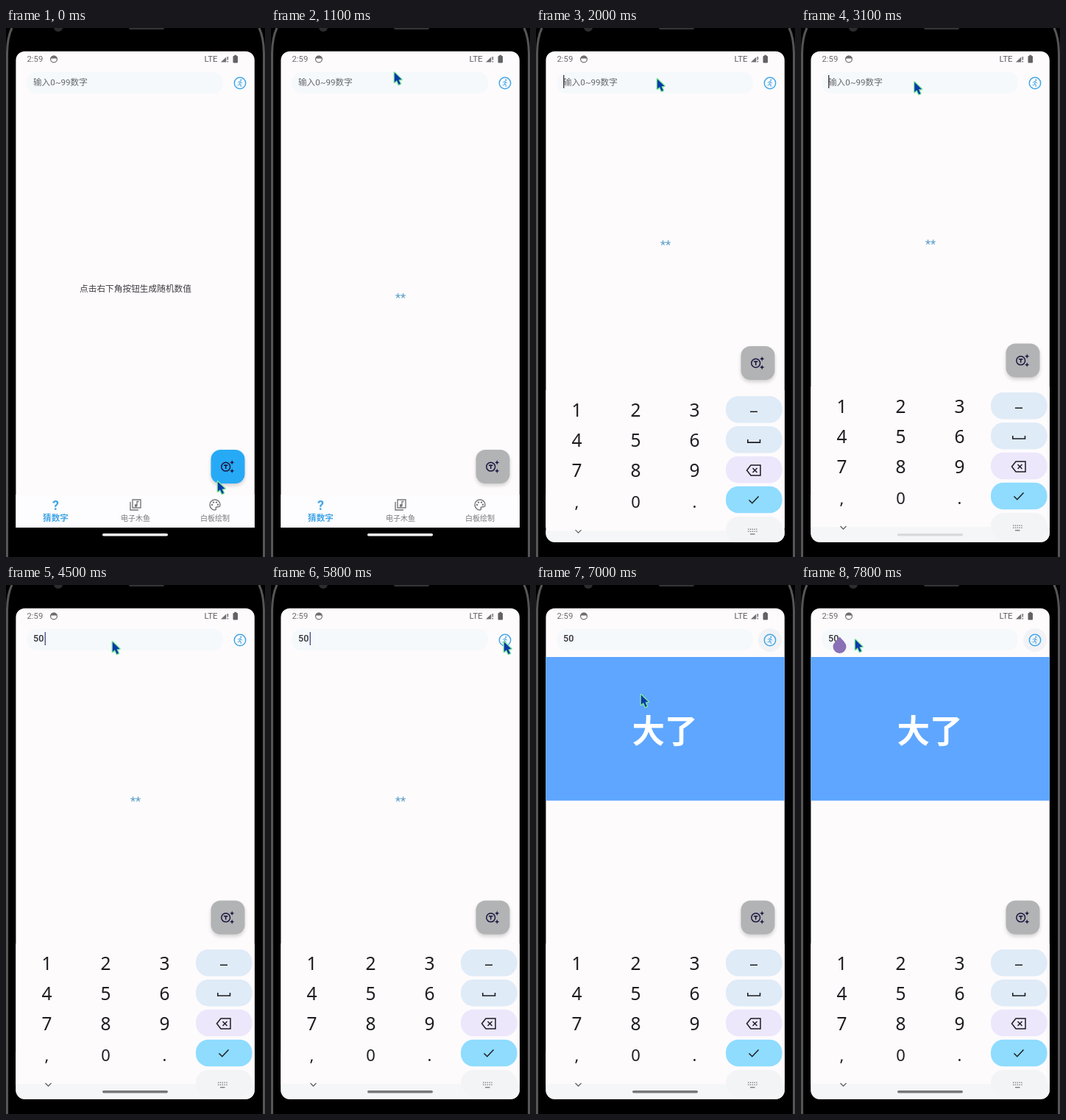
Recreate the animation shown at these times as an HTML page with a canvas. Size 352x720 px, loop 8000 ms.

```html
<!DOCTYPE html>
<html lang="zh">
<head>
<meta charset="utf-8">
<title>猜数字</title>
<style>
html, body { margin: 0; width: 100%; height: 100%; overflow: hidden; background: #000; }
canvas { display: block; width: 352px; height: 720px; }
</style>
</head>
<body>
<canvas id="stage"></canvas>
<script>
const W = 352, H = 720, LOOP = 8000;
const FONT = 'Roboto, "Noto Sans CJK SC", "Noto Sans CJK", sans-serif';
const KEY_FONT = '"Noto Sans", "Open Sans", sans-serif';
const PAGE = '#fefbfd', BLUE = '#41a5e6', GREY = '#777779', INK = '#1d1d20';
const canvas = document.getElementById('stage');
const dpr = window.devicePixelRatio || 1;
canvas.width = W * dpr;
canvas.height = H * dpr;
const c = canvas.getContext('2d');

// Pointer stops: time, x, y
const STOPS = [
  [0, 287, 617], [550, 287, 617], [1080, 167, 60], [1400, 164, 69],
  [2780, 164, 69], [3400, 144, 77], [4950, 144, 77], [5750, 316, 77],
  [6380, 316, 77], [6720, 176, 186], [7450, 73, 74], [LOOP, 73, 74]
];

const clamp = v => Math.max(0, Math.min(1, v));
const ramp = (t, a, b) => clamp((t - a) / (b - a));
const ease = v => v * v * (3 - 2 * v);
const mix = (a, b, k) => a + (b - a) * k;
const blend = (a, b, k) => `rgb(${a.map((v, i) => Math.round(mix(v, b[i], k)))})`;

function text(s, x, y, size, color, align = 'center', weight = 400, font = FONT) {
  c.font = `${weight} ${size}px ${font}`;
  c.textAlign = align;
  c.fillStyle = color;
  c.fillText(s, x, y);
}

function box(x, y, w, h, r, color) {
  c.beginPath();
  c.roundRect(x, y, w, h, r);
  c.fillStyle = color;
  c.fill();
}

function dot(x, y, r, color) {
  c.beginPath();
  c.arc(x, y, r, 0, 7);
  c.fillStyle = color;
  c.fill();
}

function ring(x, y, r, color, w) {
  c.beginPath();
  c.arc(x, y, r, 0, 7);
  c.strokeStyle = color;
  c.lineWidth = w;
  c.stroke();
}

function trace(pts, closed) {
  c.beginPath();
  pts.forEach(p => c.lineTo(p[0], p[1]));
  if (closed) c.closePath();
}

function line(pts, color, w, closed) {
  trace(pts, closed);
  c.strokeStyle = color;
  c.lineWidth = w;
  c.stroke();
}

function shape(pts, color) {
  trace(pts, true);
  c.fillStyle = color;
  c.fill();
}

function at(x, y, draw) {
  c.save();
  c.translate(x, y);
  draw();
  c.restore();
}

function bezel() {
  c.fillStyle = '#000';
  c.fillRect(0, 0, W, H);
  for (const side of [0, 1]) {
    c.save();
    if (side) { c.translate(W, 0); c.scale(-1, 1); }
    c.beginPath();
    c.moveTo(8, 0);
    c.quadraticCurveTo(2, 12, 1.5, 34);
    c.lineTo(1.5, H);
    c.strokeStyle = '#555';
    c.lineWidth = 3;
    c.stroke();
    c.restore();
  }
  dot(71, -1, 6, '#2c2c2e');
  box(167, -4, 48, 6, 2, '#343436');
}

function statusBar() {
  text('2:59', 28.5, 46, 11.3, '#6c6c6e', 'left');
  ring(65, 42.5, 4.4, '#6c6c6e', 1.2);
  c.beginPath();
  c.arc(65, 42.5, 4.8, Math.PI * 1.06, Math.PI * 1.94);
  c.fillStyle = '#6c6c6e';
  c.fill();
  text('LTE', 269.5, 46, 11.6, '#626264', 'left');
  shape([[292, 46.5], [302.5, 46.5], [302.5, 36.5]], '#707072');
  box(299.3, 36, 4, 11, 0, PAGE);
  box(300.6, 39, 1.5, 4.5, 0, '#707072');
  box(300.6, 45, 1.5, 1.5, 0, '#707072');
  box(308.5, 38, 6.5, 9.5, 1, '#626264');
  box(310.3, 36.8, 3, 2, 0, '#626264');
}

function runner(x, y) {
  ring(x, y, 7.7, BLUE, 1.5);
  at(x, y, () => {
    dot(1.3, -4.2, 1.1, BLUE);
    line([[-2.8, -.2], [-1.6, -2], [.8, -2.2], [1.6, -.4], [3.2, 0]], BLUE, .9);
    line([[.4, -2], [-.5, 1], [1.2, 2.4], [1.2, 5]], BLUE, 1.1);
    line([[-.5, 1], [-1, 2.6], [-3.4, 2.7]], BLUE, .9);
  });
}

function searchBar(t) {
  box(28, 59.5, 267, 30, 14, '#f6f9fc');
  if (t >= 5950) dot(318, 75, 16 * ease(ramp(t, 5900, 6200)), '#f1f3f6');
  runner(318, 75);
  const typed = t < 3600 ? '' : t < 3850 ? '5' : '50';
  if (typed) text(typed, 37, 77, 12.6, '#323236', 'left', 500);
  else text('输入0~99数字', 37, 78, 11.6, '#66686c', 'left');

  let alpha = 0;
  if (t >= 1900 && t < 3600) alpha = (t - 1900) % 1000 < 500 ? 1 : 0;
  else if (t >= 3600 && t < 4000) alpha = 1;
  else if (t >= 4500 && t < 7000) {
    const k = (t - 4500) % 1000;
    alpha = k < 500 ? 1 : 1 - ramp(k, 500, 950);
  }
  c.globalAlpha = alpha;
  box(typed ? 37.8 + typed.length * 7.4 : 37, 64, 1.4, 18, 0, typed ? '#50558c' : '#44454c');
  c.globalAlpha = 1;
}

function tabs() {
  c.fillStyle = '#fdfcfe';
  c.fillRect(13, 635, 325, 45);
  text('?', 67.5, 655.5, 18, BLUE, 'center', 700);
  text('猜数字', 67.5, 671, 11.6, BLUE, 'center', 700);
  at(176, 649, () => {
    line([[-4, -7], [7, -7], [7, 4], [-4, 4]], GREY, 1.4, true);
    line([[-7, -4], [-7, 7], [4, 7]], GREY, 1.4);
    dot(.6, 1, 1.9, GREY);
    line([[2, 1], [2, -4.5], [4.6, -4.5]], GREY, 1.3);
  });
  text('电子木鱼', 176, 671, 10, GREY);
  at(284, 649, () => {
    c.beginPath();
    c.arc(0, 0, 7, Math.PI * .5, Math.PI * 2);
    c.bezierCurveTo(7, 5, 1.5, 1, 1, 4);
    c.bezierCurveTo(2, 5.5, 1.5, 7, 0, 7);
    c.strokeStyle = GREY;
    c.lineWidth = 1.4;
    c.stroke();
    [[-4, 0], [-2, -3.4], [2, -3.4], [4, -.2]].forEach(p => dot(p[0], p[1], 1.2, GREY));
  });
  text('白板绘制', 284, 671, 10, GREY);
}

function spark(x, y) {
  shape([[x, y - 3.2], [x + .9, y - .9], [x + 3.2, y], [x + .9, y + .9],
    [x, y + 3.2], [x - .9, y + .9], [x - 3.2, y], [x - .9, y - .9]], '#1b1540');
}

function actionButton(y, k) {
  c.save();
  c.shadowColor = 'rgba(0,0,0,.17)';
  c.shadowBlur = 5 * dpr;
  c.shadowOffsetY = 3 * dpr;
  box(278.5, y, 46, 46, 13, blend([39, 170, 245], [178, 179, 180], k));
  c.restore();
  at(301.2, y + 23, () => {
    ring(-2.5, .2, 5.9, '#1b1540', 1.5);
    box(-5.3, -2.6, 5.6, 1.5, 0, '#1b1540');
    box(-3.3, -2.6, 1.6, 5.6, 0, '#1b1540');
    spark(6, -5.7);
    spark(6, 5.8);
  });
}

function result(t) {
  if (t < 6130) return;
  c.fillStyle = '#5ea6ff';
  c.fillRect(13, 98, 325, 195.5);
  const size = 44.6 * ramp(t, 6130, 6328);
  if (size > 1) text('大了', 175, 198.5 + size * .37, size, '#fff', 'center', 700);
}

function keyboard(drop, pill) {
  at(0, drop, () => {
    c.fillStyle = PAGE;
    c.fillRect(13, 488, 325, 240);
    c.fillStyle = '#f5f6f8';
    c.fillRect(13, 679, 325, 50);
    box(258, 660, 76.5, 36, 17, '#f3f4f6');
    const rows = ['123', '456', '789', ',0.'];
    const mid = [515, 556.5, 597.5, 640];
    const tint = ['#dfebf7', '#dfebf7', '#ece7fb', '#8fdcff'];
    rows.forEach((row, i) => {
      const size = i < 3 ? 24.5 : 22;
      [...row].forEach((ch, j) =>
        text(ch, 55.5 + j * 80, mid[i] + size * .36, size, INK, 'center', 400, KEY_FONT));
      box(258, 496 + i * 40.9, 76.5, 36.5, 17, tint[i]);
    });
    box(291, 516.5, 10, 1.5, 0, INK);
    line([[287.8, 555], [287.8, 559], [304.5, 559], [304.5, 555]], INK, 1.6);
    at(296, 597, () => {
      line([[-9.5, 0], [-4, -7], [9, -7], [9, 7], [-4, 7]], INK, 1.5, true);
      line([[-1.5, -3], [4.5, 3]], INK, 1.5);
      line([[4.5, -3], [-1.5, 3]], INK, 1.5);
    });
    line([[289.5, 637.5], [293.8, 641.7], [302.5, 632.5]], INK, 1.5);
    line([[53.5, 678], [57.5, 682], [61.5, 678]], '#606266', 1.3);
    for (let i = 0; i < 10; i++) {
      box(288 + (i % 5) * 2.8, 676.5 + Math.floor(i / 5) * 3, 1.4, 1.4, 0, '#85878b');
    }
    box(291, 683, 6.5, 1.4, 0, '#85878b');
  });
  c.globalAlpha = pill;
  box(131, 688, 89, 3.4, 1.7, '#77787a');
  c.globalAlpha = 1;
}

function pointer(t) {
  let i = 0;
  while (i < STOPS.length - 2 && t >= STOPS[i + 1][0]) i++;
  const [t0, x0, y0] = STOPS[i], [t1, x1, y1] = STOPS[i + 1];
  const k = ease(ramp(t, t0, t1));
  at(mix(x0, x1, k), mix(y0, y1, k), () => {
    const arrow = [[.8, .5], [.8, 14], [4, 11.2], [6.6, 17], [9, 16], [6.5, 10.4], [10.6, 10]];
    c.lineJoin = 'round';
    line(arrow, '#86eb9c', 2.6, true);
    shape(arrow, '#0a3ba8');
    c.lineJoin = 'miter';
  });
}

function handle() {
  c.beginPath();
  c.moveTo(52.5, 70.5);
  c.lineTo(59, 77.5);
  c.arc(52.5, 84, 9, -Math.PI / 4, Math.PI * 1.25);
  c.closePath();
  c.fillStyle = '#8a70b5';
  c.fill();
}

function draw(t) {
  c.setTransform(dpr, 0, 0, dpr, 0, 0);
  bezel();

  const open = .976 * ease(ramp(t, 1420, 1600)) + .024 * ease(ramp(t, 2020, 2350));
  c.save();
  c.beginPath();
  c.roundRect(13.4, 31.7, 324.4, 668, 12);
  c.clip();
  c.fillStyle = PAGE;
  c.fillRect(13, 31, 325, 649);
  statusBar();
  searchBar(t);
  if (t < 200) text('点击右下角按钮生成随机数值', 176, 359, 11.7, '#3c3c3f');
  else if (t < 6130) text('**', 176, 372.6 - 73 * open, 16.5, '#5b9fc8');
  result(t);
  actionButton(574 - 144.5 * open, ramp(t, 80, 380));
  tabs();
  box(131, 688, 89, 3.4, 1.7, '#fff');
  if (open > 0) keyboard((1 - open) * 212, ramp(t, 2900, 3800));
  c.restore();

  if (t >= 7700) handle();
  pointer(t);
}

function tick(now) {
  draw(now % LOOP);
  requestAnimationFrame(tick);
}
draw(0);
requestAnimationFrame(tick);
</script>
</body>
</html>
```
